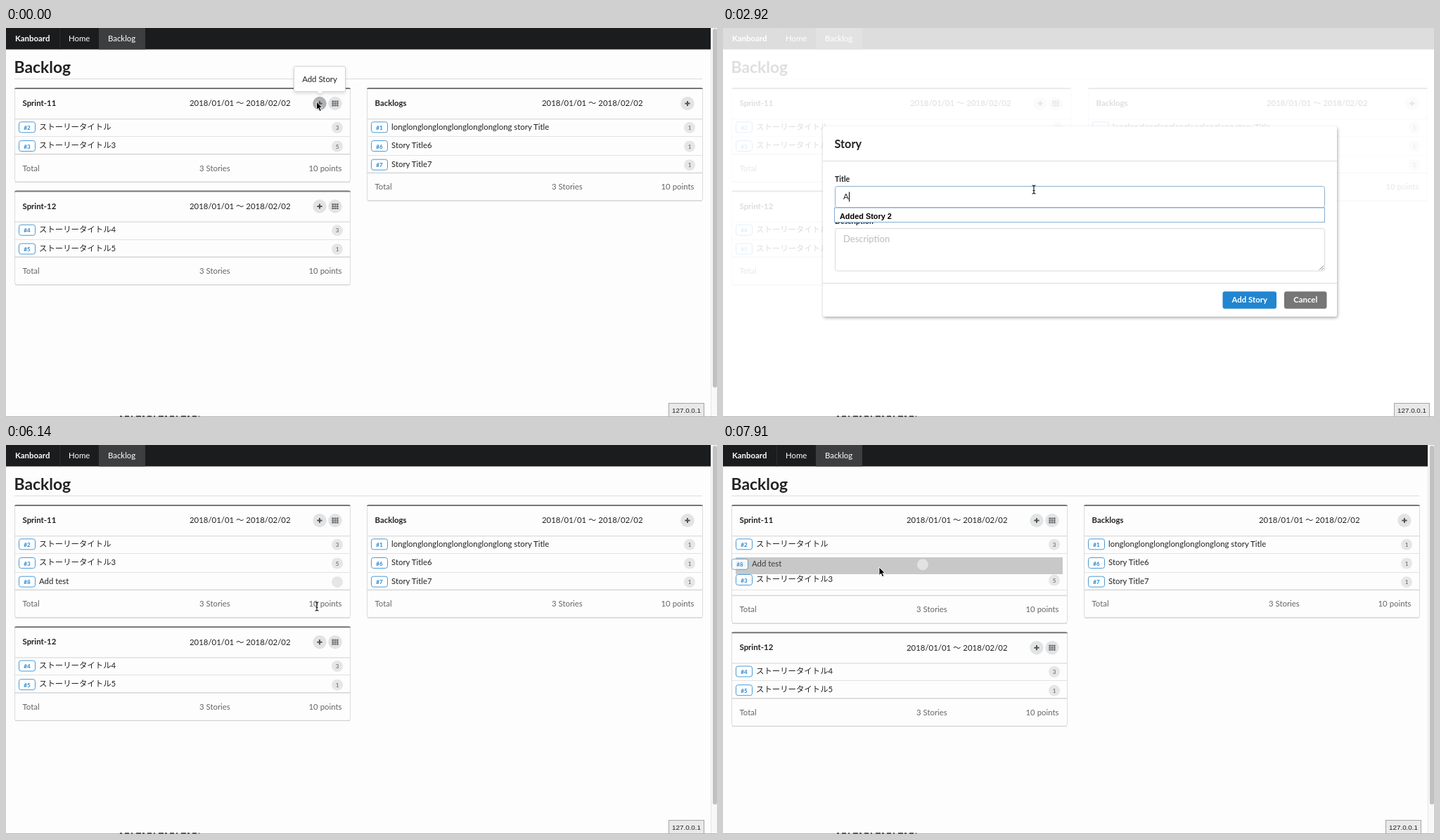
Recreate the animation shown at these times as an HTML page. Size 1011 by 554 pixels, loop 7.99 s.

```html
<!DOCTYPE html>
<html lang="en">
<head>
<meta charset="utf-8">
<title>Backlog</title>
<style>
html, body { margin: 0; width: 100%; height: 100%; overflow: hidden; background: #fdfdfd; }
svg { display: block; width: 100%; height: 100%; }
text { font: 11.4px Lato, "Noto Sans CJK JP", "Noto Sans CJK", sans-serif; fill: #222; white-space: pre; }
.b { font-weight: 700; }
.muted { fill: #666; }
.white { fill: #fff; }
.h1 { font-size: 22.9px; }
.h2 { font-size: 16.3px; }
.label { font-size: 10.6px; }
.area { font-size: 13px; }
.id { font-size: 8px; font-weight: 700; fill: #2185d0; }
.count { font-size: 8px; fill: #555; }
.ui { font: 9.9px "Liberation Sans", Arial, sans-serif; }
.opt { font: bold 10.9px "Liberation Sans", "Noto Sans CJK JP", sans-serif; fill: #000; }
</style>
</head>
<body>
<svg id="stage" viewBox="0 0 1011 554" preserveAspectRatio="none"></svg>
<script>
const LOOP = 7990;
const stage = document.getElementById('stage');
const pen = document.createElement('canvas').getContext('2d');

const ROW = 26.7;
const JP = 'ストーリータイトル';
const SPRINT_11 = [[2, JP, 3], [3, JP + 3, 5]];
const SPRINT_12 = [[4, JP + 4, 3], [5, JP + 5, 1]];
const BACKLOG = [[1, 'long'.repeat(8) + ' story Title', 1], [6, 'Story Title6', 1], [7, 'Story Title7', 1]];
const ADDED = [8, 'Add test', ''];
const HISTORY = ['Added Story 2', 'Story Title7', 'Story Title6', JP + 5, JP + 4, JP + 3];

// [time, value]: the last entry reached is in force
const TITLE = [[0, ''], [2920, 'A'], [3280, 'Ad'], [3420, 'Add'], [3840, 'Add '],
  [4080, 'Add t'], [4170, 'Add te'], [4270, 'Add tes'], [4360, 'Add test']];
const NOTES = [[0, ''], [4950, 'h'], [5030, 'hog'], [5110, 'hogeh'], [5190, 'hogeho'], [5270, 'hogehoge']];
const CARET = [[0, ''], [290, 'title'], [590, ''], [1040, 'title'], [2020, ''], [2500, 'title'], [4600, 'notes'], [5750, '']];
const OPTIONS = [[0, 0], [1850, 6], [2920, 1], [3840, 0]];
const TITLE_EDGE = [[0, '#d9d9d9'], [290, '#8eb0c8'], [4600, '#b4b4b4'], [4660, '#d9d9d9']];
const NOTES_EDGE = [[0, '#d9d9d9'], [4600, '#cccccc'], [4660, '#8eb0c8'], [5750, '#b8c8d4'], [5810, '#d9d9d9']];
const SUBMIT = [[0, '#2185d0'], [5750, '#1d7bc7'], [5810, '#1a70bd']];

// [time, x, y] of the pointer tip
const PATH = [[0, 441.5, 105], [1220, 441.5, 106], [1790, 442, 230], [6639, 442, 230], [6640, 418, 233],
  [6790, 416, 233], [7070, 237, 226], [7240, 223.5, 203], [7410, 222, 201], [7580, 222, 199], [7910, 222, 174]];
// [start, end, count]: spans in which the pointer advances in even steps
const STEPS = [[1220, 1850, 12], [6790, 7410, 12], [7580, 7910, 6]];

const at = (list, t) => list.filter(e => e[0] <= t).pop()[1];

function tick(t) {
  for (const [from, to, n] of STEPS) {
    if (t >= from && t < to) {
      const d = (to - from) / (n - 1);
      return from + Math.floor((t - from) / d) * d;
    }
  }
  return t;
}

function pointer(t) {
  let i = 0;
  while (i < PATH.length - 2 && PATH[i + 1][0] <= t) i++;
  const [a, x, y] = PATH[i], [b, u, v] = PATH[i + 1];
  let k = Math.min(1, (t - a) / (b - a));
  // the pointer rests outside the stepped spans
  if (!STEPS.some(s => t >= s[0] && t <= s[1])) k = t >= b ? 1 : 0;
  if (a === 1220) k = k * k * (3 - 2 * k);
  return [x + (u - x) * k, y + (v - y) * k];
}

const rect = (x, y, w, h, fill, more = '') => `<rect x="${x}" y="${y}" width="${w}" height="${h}" fill="${fill}" ${more}/>`;
const box = (x, y, w, h, fill, edge, r = 3) => rect(x, y, w, h, fill, `stroke="${edge}" rx="${r}"`);
const text = (x, y, s, cls = '', anchor = 'start') => `<text x="${x}" y="${y}" class="${cls}" text-anchor="${anchor}">${s}</text>`;
const disc = (x, y, r, fill) => `<circle cx="${x}" cy="${y}" r="${r}" fill="${fill}"/>`;
const path = (d, fill, more = '') => `<path d="${d}" fill="${fill}" ${more}/>`;

function plusButton(x, y, hot) {
  return disc(x, y, 9.7, hot ? '#b0b1b2' : '#e2e3e4') +
    path(`M${x - 3.6} ${y}h7.2M${x} ${y - 3.6}v7.2`, 'none', 'stroke="#555" stroke-width="2"');
}

function gridButton(x, y) {
  let s = disc(x, y, 9.7, '#e2e3e4');
  for (let i = 0; i < 9; i++) s += rect(x - 4.6 + i % 3 * 3.3, y - 4 + Math.floor(i / 3) * 2.9, 2.6, 2.2, '#666');
  return s;
}

function story([id, name, points], x, y, badgeX) {
  return box(x + 6.5, y - 7, 23, 15, '#fff', '#4a9ad8') + text(x + 18, y + 4, '#' + id, 'id', 'middle') +
    text(x + 35, y + 3.7, name) +
    disc(badgeX, y + 1, 8, '#e6e6e6') + text(badgeX, y + 4, points, 'count', 'middle');
}

// gap: index of the drop slot, or -1
function card(x, y, w, name, rows, { hot = false, grid = true, gap = -1 } = {}) {
  const right = x + w;
  const foot = y + 41.3 + ROW * (rows.length + (gap < 0 ? 0 : 1)) + (gap < 0 ? 0 : 8);
  let s = box(x + .5, y + .5, w - 1, foot - y + 39, '#fdfdfd', '#dcdcdc') +
    rect(x + 1, foot + 39.2, w - 2, 1, '#cfcfcf') +
    path(`M${x} ${y + 2}q0-2 3-2h${w - 6}q3 0 3 2z`, '#767676') +
    text(x + 11.5, y + 26.2, name, 'b') +
    text(right - 229, y + 26.4, '2018/01/01 〜 2018/02/02');
  if (grid) s += gridButton(right - 22, y + 22.5);
  s += plusButton(right - (grid ? 44 : 22), y + 22.5, hot) + rect(x + 1, y + 44, w - 2, 1.3, '#dcdcdc');
  rows.forEach((row, i) => {
    const shift = gap >= 0 && gap <= i ? 24 : 0;
    s += story(row, x, y + 55.8 + ROW * i + shift, right - 19);
    if (i < rows.length - 1 || gap >= 0) s += rect(x + 1, Math.round(y + 69 + ROW * i + (shift && 25)), w - 2, 1, '#e2e2e2');
  });
  if (gap >= 0) s += rect(x + 6, y + 75 + ROW * (gap - 1), w - 13, 24, '#c8c8c8');
  return s + rect(x + 1, foot - .8, w - 2, 1.6, '#d8d8d8') +
    text(x + 11.5, foot + 24, 'Total', 'muted') +
    text(x + w / 2 + 24, foot + 24, '3 Stories', 'muted') +
    text(right - 12.5, foot + 24, '10 points', 'muted', 'end');
}

function page(wide, t) {
  const w = wide ? 483 : 478, full = wide ? 1011 : 1002;
  const added = t >= 6140, drag = t >= 7580;
  const gap = drag ? (t >= 7770 ? 1 : 2) : -1;
  const rows = added && !drag ? [...SPRINT_11, ADDED] : SPRINT_11;
  const second = 231.5 + (added ? ROW : 0) + (drag ? 8 : 0);
  return rect(0, 0, 1011, 554, '#fdfdfd') +
    rect(0, 0, full, 30.5, '#1b1c1d') + rect(132, 0, 66, 30.5, '#3d3e3f') + rect(76, 0, 1, 30.5, '#2a2b2c') +
    text(13, 18.7, 'Kanboard', 'b white') + text(89, 18.7, 'Home', 'white') + text(145, 18.7, 'Backlog', 'white') +
    text(11.5, 64, 'Backlog', 'b h1') + rect(12, 72, full - 24, 1, '#dcdcdc') +
    card(12, 85, w, 'Sprint-11', rows, { hot: t < 110, gap }) +
    card(12, second, w, 'Sprint-12', SPRINT_12) +
    card(wide ? 519 : 513, 85, w, 'Backlogs', BACKLOG, { grid: false });
}

function scrollbar() {
  return rect(1002, 0, 9, 554, '#f8f8f8') + rect(1002, 0, 1, 554, '#e6e6e6') + rect(1005, 1, 6, 511, '#c1c1c1', 'rx="3"');
}

function tooltip() {
  return path('M411.5 54.5h69q2 0 2 2v32q0 2-2 2h-30l-4 4-4-4h-31q-2 0-2-2v-32q0-2 2-2z', '#fff',
    'stroke="#d4d4d5" style="filter:drop-shadow(0 2px 2px rgba(34,36,38,.15))"') +
    text(446, 76.5, 'Add Story', '', 'middle');
}

function field(value, hint, focused, caret, x, y, size) {
  const cls = size > 12 ? 'area' : '';
  pen.font = size + 'px Lato, sans-serif';
  const end = x + pen.measureText(value).width;
  return (value ? text(x, y, value, cls)
    : `<text x="${x}" y="${y}" class="${cls}" style="fill:${focused ? '#7a7a7a' : '#bdbdbd'}">${hint}</text>`) +
    (caret ? rect(Math.round(end), y - 11, 1, 14, '#000') : '');
}

function dropdown(n) {
  if (!n) return '';
  const h = 19.7;
  return box(158.5, 256, 697, n * h + .8, '#fff', '#86aed2', 0) +
    HISTORY.slice(0, n).map((s, i) => text(166, 271.5 + h * i, s, 'opt')).join('');
}

function modal(t) {
  const caret = at(CARET, t);
  return rect(142, 140, 731, 271, '#fff', 'rx="3" style="filter:drop-shadow(1px 2px 2px rgba(0,0,0,.32))"') +
    text(158.5, 170.5, 'Story', 'b h2') + rect(142, 189, 731, 1, '#dcdcdc') +
    text(159, 218.5, 'Title', 'b label') + box(159.5, 225.5, 696, 30, '#fff', at(TITLE_EDGE, t)) +
    field(at(TITLE, t), 'Title', t >= 290, caret === 'title', 171, 244.4, 11.4) +
    text(159, 278.5, 'Description', 'b label') + box(159.5, 285.5, 696, 60.5, '#fff', at(NOTES_EDGE, t)) +
    field(at(NOTES, t), 'Description', t >= 4600, caret === 'notes', 171, 305.4, 13) +
    path('M848 344.5l6-6M851.5 344.5l2.5-2.5', 'none', 'stroke="#777"') +
    rect(142, 363, 731, 1, '#dcdcdc') +
    rect(710.5, 375.3, 76.5, 24.4, at(SUBMIT, t), 'rx="3"') + text(748.7, 391.4, 'Add Story', 'b white', 'middle') +
    rect(798, 375.3, 60.5, 24.4, '#767676', 'rx="3"') + text(828.2, 391.4, 'Cancel', 'b white', 'middle') +
    dropdown(at(OPTIONS, t));
}

function dragged(y) {
  return `<g opacity=".85">${story(ADDED, 6, y - 4.7, 284)}</g>`;
}

function cursor(x, y, beam) {
  if (beam) {
    return path(`M${x - 2.5} ${y - 6}q2.5 0 2.5 1.5q0-1.5 2.5-1.5M${x} ${y - 5}v10M${x - 2.5} ${y + 6}q2.5 0 2.5-1.5q0 1.5 2.5 1.5M${x - 1.5} ${y + 1.5}h3`,
      'none', 'stroke="#111" stroke-width="1.1"');
  }
  return path(`M${x} ${y}v11.5l2.6-2.3 2 4.4 2.2-1-1.9-4.2h3.5z`, '#000', 'stroke="#fff" stroke-width=".9"');
}

function frame(edge) {
  return box(edge - 49.5, 534.5, 50, 21, '#e9e9e9', '#a5a5a5', 0) + text(edge - 24.5, 547.7, '127.0.0.1', 'ui', 'middle') +
    rect(0, 553, 1011, 1, '#b4b4b4') +
    path('M162 553h113', 'none', 'stroke="#333" stroke-width="1.6" stroke-dasharray="3 4 6 3 2 5 7 2"');
}

function scene(t) {
  const open = t >= 110 && t < 6140;
  const typing = t >= 2920 && t < 6140;
  const [x, y] = pointer(tick(t));
  const beam = t < 6640 && y >= 226;
  let s = page(open, t);
  s += open ? rect(0, 0, 1011, 554, 'rgba(255,255,255,.85)') + modal(t) : scrollbar();
  if (t < 290) s += tooltip();
  if (t >= 7580) s += dragged(y);
  return s + frame(open ? 1004 : 992) + cursor(x, y, beam);
}

let shown = '';
function draw(now) {
  const next = scene(now % LOOP);
  if (next !== shown) stage.innerHTML = shown = next;
}

const start = performance.now();
function loop() {
  draw(performance.now() - start);
  requestAnimationFrame(loop);
}
loop();
</script>
</body>
</html>
```
